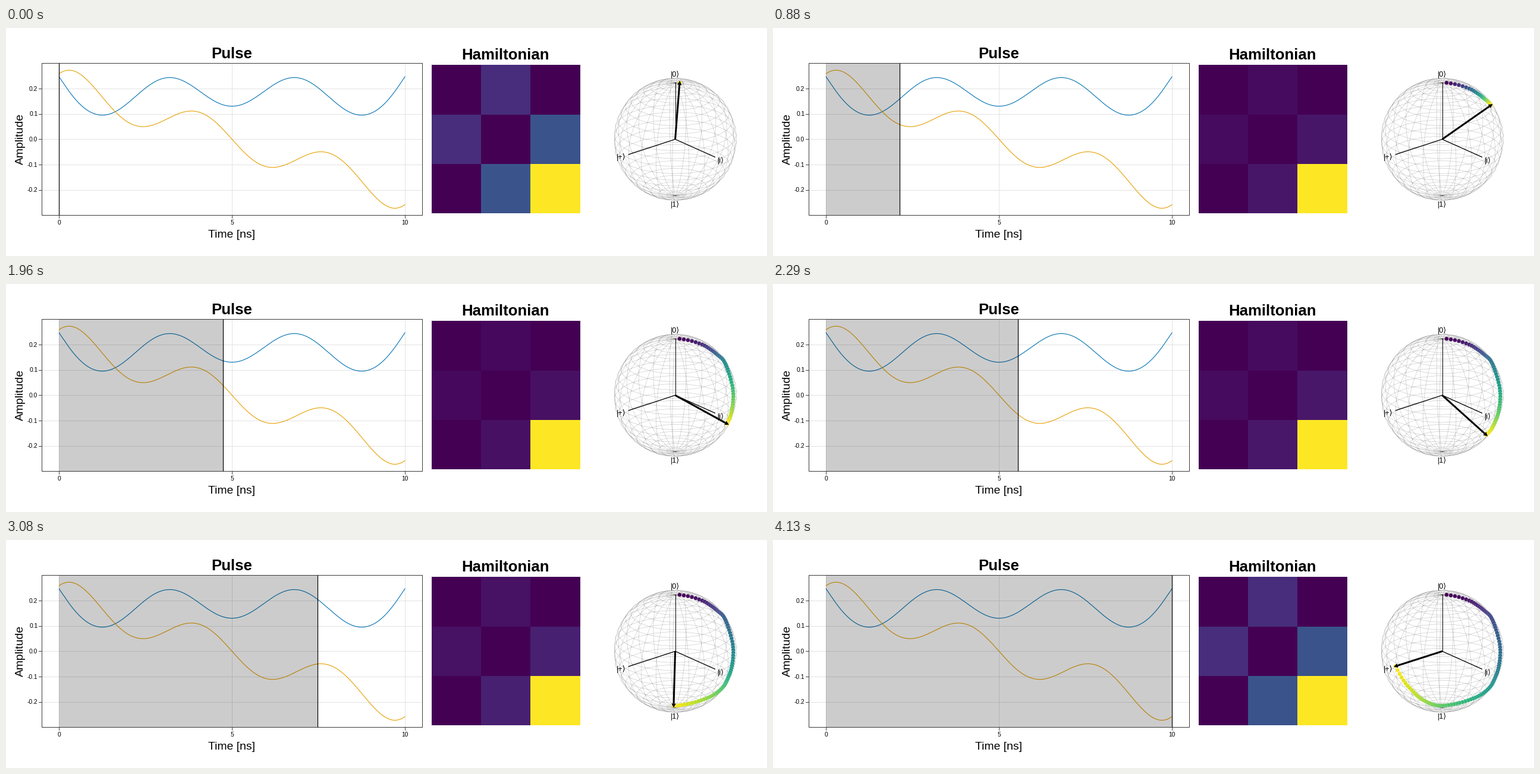
Recreate the animation shown at these times as a matplotlib script. Size 1280 by 384 pixels, loop 4.18 s.

```python
import numpy as np
import matplotlib.pyplot as plt
from matplotlib.animation import FuncAnimation
from matplotlib.patches import Polygon, Rectangle

W, H, DPI = 1280, 384, 100
PT = 72 / DPI
STEPS = 100
SLOT, LOOP = 20, 4180
T_END = 10
SANS = ["Liberation Sans", "DejaVu Sans"]
VIRIDIS = plt.get_cmap("viridis")

fig = plt.figure(figsize=(W / DPI, H / DPI), dpi=DPI, facecolor="white")
ax = fig.add_axes([0, 0, 1, 1])
ax.set(xlim=(0, W), ylim=(H, 0))
ax.axis("off")


def line(x, y, color="black", width=1.0, z=2, **kw):
    return ax.plot(x, y, color=color, lw=width * PT, zorder=z, **kw)[0]


def label(x, y, text, size, **kw):
    opts = dict(ha="center", va="baseline", family=SANS, zorder=8) | kw
    return ax.text(x, y, text, fontsize=size * PT, **opts)


# --- pulses: polynomials pinned at their turning points ---
def fit(powers, values, flats):
    rows = [[t ** p for p in powers] for t, _ in values]
    rows += [[p * t ** max(p - 1, 0) for p in powers] for t in flats]
    rhs = [v for _, v in values] + [0] * len(flats)
    coef = np.linalg.solve(rows, rhs)
    return lambda t: sum(c * (t / 5 - 1) ** p for c, p in zip(coef, powers))


drive_x = fit(range(0, 14, 2),
              [(0, 0.130), (0.36, 0.2428), (0.75, 0.0948), (0.9, 0.153),
               (1, 0.246)],
              [0.36, 0.75])
drive_y = fit(range(1, 15, 2),
              [(0.235, -0.111), (0.514, -0.0495), (0.942, -0.272), (1, -0.258)],
              [0.235, 0.514, 0.942])
times = np.linspace(0, T_END, STEPS)
ux, uy = drive_x(times), drive_y(times)


def glide(at, knots):
    """Smooth cubic curve through rows of (step, x, y)."""
    knots = np.array(knots, float)
    t, p = knots[:, 0], knots[:, 1:]
    slope = np.gradient(p, t, axis=0, edge_order=2)
    i = np.clip(np.searchsorted(t, at, side="right") - 1, 0, len(t) - 2)
    h = (t[i + 1] - t[i])[:, None]
    s = (at - t[i])[:, None] / h
    a, b = p[i], p[i + 1]
    return (a + (b - a) * s * s * (3 - 2 * s)
            + h * s * (1 - s) * (slope[i] * (1 - s) - slope[i + 1] * s))


# --- pulse plot ---
LEFT, RIGHT, TOP, BOTTOM = 60, 700, 59, 315.4


def px(t):
    return 89.2 + 58.18 * t


def py(u):
    return 187.3 - 427.5 * u


for t in (0, 5, 10):
    line([px(t)] * 2, [TOP, BOTTOM], "#e0e0e0", 0.9, 1)
    line([px(t)] * 2, [BOTTOM, BOTTOM + 5], "#333333", 0.9)
    label(px(t), 331.3, str(t), 10.3)
for u in (0.2, 0.1, 0.0, -0.1, -0.2):
    line([LEFT, RIGHT], [py(u)] * 2, "#e0e0e0", 0.9, 1)
    line([LEFT - 5, LEFT], [py(u)] * 2, "#333333", 0.9)
    label(53.3, py(u) + 3.7, f"{u:.1f}", 10.3, ha="right")

fine = np.linspace(0, T_END, 400)
line(px(fine), py(drive_x(fine)), "#0072b2", 1.1, 3)
line(px(fine), py(drive_y(fine)), "#e69f00", 1.1, 3)
shade = ax.add_patch(Rectangle((px(0), TOP), 0, BOTTOM - TOP, fc="black",
                               alpha=0.2, lw=0, zorder=4))
cursor = line([], [], width=1.2, z=5)
ax.add_patch(Rectangle((LEFT, TOP), RIGHT - LEFT, BOTTOM - TOP, fill=False,
                       ec="#333333", lw=0.95 * PT, zorder=6))
label(380, 51.3, "Pulse", 25.8, weight="bold")
label(380, 352.6, "Time [ns]", 19.4)
label(33, 187.5, "Amplitude", 19.4, rotation=90, ha="right", va="center")

# --- matrix ---
label(840.5, 53.4, "Hamiltonian", 25.8, weight="bold")
CELL = 83.35
cells = [[ax.add_patch(Rectangle((715.6 + CELL * c, 62.4 + CELL * r), CELL, CELL,
                                 lw=0, fc=VIRIDIS(0.0))) for c in range(3)]
         for r in range(3)]
cells[2][2].set_facecolor(VIRIDIS(1.0))

# --- sphere ---
CX, CY, R = 1125.6, 187.4, 103
AZ, EL = 0.275 * np.pi, np.pi / 8


def project(p):
    x, y, z = np.moveaxis(np.asarray(p, float), -1, 0)
    right = -np.sin(AZ) * x + np.cos(AZ) * y
    up = np.cos(EL) * z - np.sin(EL) * (np.cos(AZ) * x + np.sin(AZ) * y)
    return np.stack([CX + R * right, CY - R * up], -1)


def spherical(theta, phi):
    theta, phi = np.broadcast_arrays(theta, phi)
    return np.stack([np.sin(theta) * np.cos(phi),
                     np.sin(theta) * np.sin(phi), np.cos(theta)], -1)


polar = np.linspace(0, np.pi, 24)
around = np.linspace(0, 2 * np.pi, 24)
mesh = [spherical(polar, a) for a in around[:-1]]
mesh += [spherical(p, around) for p in polar[1:-1]]
for curve in mesh:
    line(*project(curve).T, "black", 0.5, 1, alpha=0.27)

for tip, width in (((1, 0, 0), 1.3), ((0, 1, 0), 1.3), ((0, 0, 1), 1.0)):
    line(*project([(0, 0, 0), tip]).T, width=width, z=3)
for x, y, name in ((1125.3, 82, "0"), (1125.3, 301.3, "1"),
                   (1035, 221.5, "+"), (1202.3, 226.8, "i")):
    label(x, y, f"|{name}⟩", 12.6)

# where the state sits on the projected sphere
path = glide(np.arange(STEPS), [
    (0, 1133, 92.3), (2, 1147, 94.5), (6, 1171, 102), (10, 1184.8, 110),
    (15, 1197, 119.5), (21, 1207.7, 130), (26, 1215, 147.5),
    (33, 1223, 180.5), (40, 1221, 212), (47, 1213, 235.5), (52, 1206.5, 247),
    (57, 1194, 258.5), (63, 1173.5, 268.5), (68, 1150, 275.5),
    (74, 1123, 279), (82, 1098, 272), (90, 1077.5, 256), (95, 1060.5, 236.5),
    (99, 1047.3, 212.5)])
dots = ax.scatter([], [], s=(6.8 * PT) ** 2, lw=0.35 * PT,
                  edgecolors=(1, 1, 1, 0.5), zorder=4)
shaft = line([], [], width=3, z=6, solid_capstyle="butt")
head = ax.add_patch(Polygon([(0, 0)] * 3, fc="black", lw=0, zorder=6))


def draw(slot):
    now = slot * SLOT + SLOT / 2
    k = min(STEPS - 1, int((now + 5) * 24 / 1000 + 1e-6))
    shade.set_width(px(times[k]) - px(0))
    cursor.set_data([px(times[k])] * 2, [TOP, BOTTOM])

    power = ux[k] ** 2 + uy[k] ** 2
    for a, b, v in ((0, 1, power), (1, 2, 2 * power)):
        cells[a][b].set_facecolor(VIRIDIS(v))
        cells[b][a].set_facecolor(VIRIDIS(v))

    dots.set_offsets(path[:k + 1])
    dots.set_facecolor(VIRIDIS(np.arange(k + 1) / k if k else [1.0]))

    origin = np.array([CX, CY])
    ray = path[k] - origin
    unit = ray / np.hypot(*ray)
    side = np.array([-unit[1], unit[0]]) * 3.6
    tip = path[k] + 3.5 * unit
    neck = tip - 7 * unit
    shaft.set_data(*np.array([origin, neck]).T)
    head.set_xy([tip, neck + side, neck - side])
    return shade, cursor, dots, shaft, head


anim = FuncAnimation(fig, draw, frames=LOOP // SLOT, interval=SLOT,
                     init_func=lambda: draw(0), repeat=True, repeat_delay=0)
plt.show()
```
